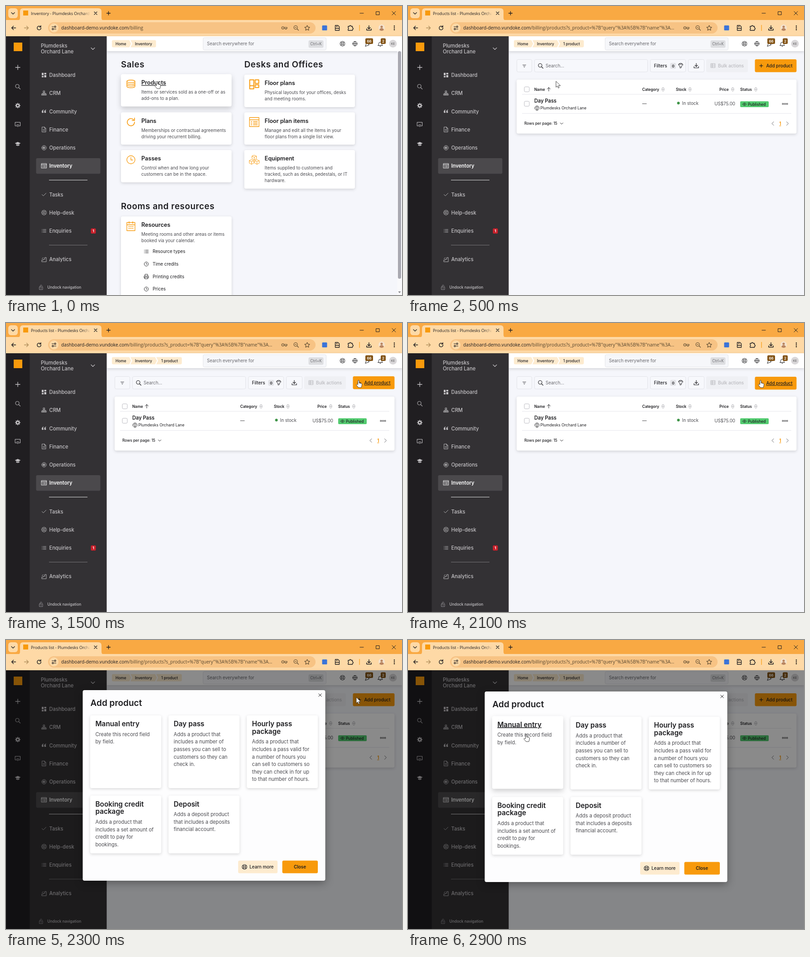
Animation, 875 px wide and 640 px high, one loop 3 s. Source, as an HTML page:

```html
<!DOCTYPE html>
<html lang="en">
<head>
<meta charset="utf-8">
<title>Inventory</title>
<style>
html,body{margin:0;height:100%;overflow:hidden}
svg{display:block;width:100vw;height:100vh;font-family:Inter,sans-serif}
.chrome{font-family:"Open Sans",sans-serif}
.shadow{filter:drop-shadow(0 2px 3px #00000026)}
.lift .shadow{filter:drop-shadow(0 5px 6px #0000002e)}
.float{filter:drop-shadow(0 5px 9px #00000055)}
</style>
</head>
<body>
<svg id="stage" viewBox="0 0 875 640"></svg>
<script>
const ORANGE = '#f89a0c', INK = '#1d1d20', NAV = '#c6c4c7', GREY = '#4b4b50', BAR = '#fed9a6';

// Drawing helpers, each returns SVG markup
const rect = (x, y, w, h, rx, fill, more = '') =>
  `<rect x="${x}" y="${y}" width="${w}" height="${h}" rx="${rx}" fill="${fill}" ${more}/>`;
const text = (x, y, s, size, fill = INK, weight = 400, more = '') =>
  `<text x="${x}" y="${y}" font-size="${size}" fill="${fill}" font-weight="${weight}" ${more}>${s}</text>`;
const lines = (x, y, rows, lh, size, fill, weight) =>
  rows.split('|').map((s, i) => text(x, y + i * lh, s, size, fill, weight)).join('');
const stroke = (x, y, d, color = INK, w = 1, fill = 'none') =>
  `<path transform="translate(${x} ${y})" d="${d}" fill="${fill}" stroke="${color}" stroke-width="${w}" stroke-linejoin="round" stroke-linecap="round"/>`;
const solid = (x, y, d, color) => stroke(x, y, d, 'none', 0, color);
const group = (id, body, more = '') => `<g id="${id}" ${more}>${body}</g>`;
const ring = r => `M${-r} 0a${r} ${r} 0 1 0 ${2 * r} 0a${r} ${r} 0 1 0 ${-2 * r} 0`;
const box = (x, y, w, h = w) => `M${x} ${y}h${w}v${h}h${-w}z`;
const panel = (x, y, w, h) => rect(x, y, w, h, 4, '#fff', 'class="shadow"');

const I = {
  plus: 'M-5 0h10M0-5v10',
  cross: 'M-4-4l8 8M4-4l-8 8',
  down: 'M-3.5-1.5l3.5 3.5 3.5-3.5',
  search: 'M-5-1a4 4 0 1 0 8 0a4 4 0 1 0-8 0M2 2l3.5 3.5',
  blocks: box(-5, -5, 4, 5.5) + box(.5, -5, 4.5, 3.5) + box(-5, 2, 4, 3) + box(.5, 0, 4.5, 5),
  tree: box(-1.5, -5, 3) + box(-5, 2, 2.5) + box(-1.2, 2, 2.5) + box(2.6, 2, 2.5) + 'M0-2v4M-3.8 2v-2h7.6v2',
  quote: 'M-5 1q0-4 4-5v1.3q-1.6 1-1.6 2a2 2 0 1 1-2.4 2zM.5 1q0-4 4-5v1.3q-1.6 1-1.6 2a2 2 0 1 1-2.4 2z',
  doc: 'M-4-5.5h5l3 3v8h-8zM1-5.5v3h3M-2 0h4M-2 2.5h4',
  chip: ring(5) + box(-2, -2, 4) + box(-1, -1, 2),
  table: box(-5.5, -5, 11, 10) + 'M-5.5-2.5h11M-3.5 0h1M-1 0h4.5M-3.5 2.5h1M-1 2.5h4.5',
  check: 'M-4.5 0l3 3 6-6',
  buoy: ring(5.2) + ring(2.3) + 'M-3.6-3.6l2 2M3.6-3.6l-2 2M-3.6 3.6l2-2M3.6 3.6l-2-2',
  list: 'M-4.5-3h.5M-2-3h6.5M-4.5 0h.5M-2 0h6.5M-4.5 3h.5M-2 3h6.5',
  chart: 'M-5 5v-3.5h3.3v-1.5h3.3v-4h3.4v9zM-4.5-1.5l3-2',
  lock: box(-3.5, -1, 7, 6) + 'M-2-1v-2a2 2 0 0 1 4 0M0 1v2',
  clock: ring(4.6) + 'M0-2.6v2.8h2.2',
  bigClock: ring(9) + 'M0-5v5.5h4',
  printer: 'M-3-1v-4h6v4M-3 3h-2v-4h10v4h-2' + box(-3, 1.5, 6, 3.5),
  globe: ring(5) + 'M-5 0h10M0-5q-4.5 5 0 10M0-5q4.5 5 0 10',
  bell: 'M-5 3.5h10q-1.6-1.5-1.6-4a3.4 3.4 0 0 0-6.8 0q0 2.5-1.6 4M-1 5.3h2',
  horn: 'M-5 5l3-8 5 5zM1-3l2-2M3 0h2.5',
  chat: 'M-5.5-5h11v8h-4l-1.5 2-1.5-2h-4zM-2-1h.1M2-1h.1M-2 1h4',
  cap: 'M-6.5-1l6.5-3 6.5 3-6.5 3zM-3.5 1.3v2.4q3.5 2 7 0v-2.4l-3.5 1.7zM-6-.8v4',
  save: 'M0-5v7M-3-.8l3 3 3-3M-5 2v3h10v-3',
  funnel: 'M-4.5-3h9a4.5 3 0 0 1-3 4v3.5l-3 .8v-4.3a4.5 3 0 0 1-3-4M-4-3a4 2.2 0 0 1 8 0',
  sort: 'M-2.5-1.8l2.5-2.6 2.5 2.6M-2.5 1.8l2.5 2.6 2.5-2.6M-3 0h6',
  pin: ring(4.8) + 'M0 3q-2-2.4-2-3.8a2 2 0 0 1 4 0q0 1.4-2 3.8v2',
  eye: 'M-4.3 0q4.3-6 8.6 0q-4.3 6-8.6 0' + ring(1.2),
  coins: 'M-9-5.5a9 3 0 1 0 18 0a9 3 0 1 0-18 0v11a9 3 0 0 0 18 0v-11M-9-1.8a9 3 0 0 0 18 0M-9 1.8a9 3 0 0 0 18 0',
  renew: 'M6-5a8 8 0 1 0 2 5M8-9v5.5h-5.5',
  plan: box(-10, -10, 9, 13) + box(2, -10, 8, 8) + box(-10, 3, 9, 7) + box(2, 1, 8, 6),
  sheet: box(-10.5, -10, 21, 20) + 'M-10.5-5h21M-7-1h2M-2-1h9M-7 2.5h2M-2 2.5h9M-7 6h2M-2 6h9',
  calendar: box(-9, -8, 18, 18) + 'M-9-3h18M-4-10v4M4-10v4M-5 1h2M-1 1h2M3 1h2M-5 5h2M-1 5h2M3 5h2',
  cube: 'M0-5l5 2v5.5l-5 2.5-5-2.5v-5.5zM-5-3l5 2.4 5-2.4M0-.6v5.6',
  arrow: 'M0 0v13l3-2.8 2 4.6 2.2-1-2-4.4h4.2z',
  hand: 'M3.7 9V1.2a1.3 1.3 0 0 1 2.6 0v4.6l4.6 1q1.9.5 1.7 2.2l-.7 4.2-1 2.8h-6l-4.6-5.5q-.7-1.6.8-1.7z'
};

// Browser window
const tab = title => text(55, 19.5, title, 9, INK, 400, 'class="chrome" clip-path="url(#tabClip)"');
const address = path => text(122, 52.3, 'dashboard-demo.vundoke.com' +
  `<tspan fill="#55462f">${path}</tspan>`, 10.2, INK, 400, 'class="chrome"');
const browser = () =>
  rect(0, 0, 875, 67, 0, '#f9a943') + rect(0, 31, 875, 36, 0, BAR) +
  rect(5, 5, 21, 22, 6, BAR) + stroke(15.5, 16, I.down, INK, 1.2) +
  solid(0, 0, 'M25 32q6 0 6-6V12q0-7 7-7h166q7 0 7 7v14q0 6 6 6z', BAR) +
  rect(38, 10, 11, 11, 0, ORANGE) + stroke(198, 16, 'M-3-3l6 6M3-3l-6 6', INK, 1.2) +
  stroke(226.5, 16, 'M-4 0h8M0-4v8', INK, 1.3) +
  stroke(786, 16, 'M-4 0h8') + stroke(821.5, 16, box(-3.5, -3.5, 7)) + stroke(857, 16, I.cross) +
  stroke(17, 48.5, 'M4.5 0h-9M-.5-4l-4 4 4 4', INK, 1.4) +
  stroke(45, 48.5, 'M-4.5 0h9M.5-4l4 4-4 4', '#b08e5c', 1.3) +
  stroke(73, 48.5, 'M3.3-2.6a4.2 4.2 0 1 0 1 2.6M4-5v3h-3', INK, 1.4) +
  rect(93, 36, 591, 25, 12.5, '#f7c384') + `<circle cx="106" cy="48.5" r="10" fill="${BAR}"/>` +
  stroke(106, 48.5, 'M-4.5-2.5h4M1-2.5a1.6 1.6 0 1 0 3.2 0a1.6 1.6 0 1 0-3.2 0M4.5 2.5h-4M-1 2.5a1.6 1.6 0 1 0-3.2 0a1.6 1.6 0 1 0 3.2 0', INK, 1.2) +
  stroke(615, 48.5, 'M-6 0a2.8 2.8 0 1 0 5.6 0a2.8 2.8 0 1 0-5.6 0M0-1.2h6v2.4h-1.5v1.5h-2v-1.5H0M-3.2 0h.2', '#5b4a30', 1.1) +
  stroke(641, 48.5, I.search + 'M-2.5-1h3', '#5b4a30', 1.1) +
  stroke(665.5, 48.5, 'M0-5.5l1.7 3.6 3.9.5-2.9 2.7.8 3.9L0 3.3l-3.5 1.9.8-3.9-2.9-2.7 3.9-.5z', '#5b4a30', 1.1) +
  rect(698.5, 43, 11, 11, 1.5, '#3b74d8') +
  stroke(732, 48.5, 'M-4.5-5.5h6l3 3v8h-9zM-4.5 1h9M-2-3h2', INK, 1.3) +
  stroke(761, 48.5, 'M-5-3.5h3a1.8 1.8 0 0 1 3.6 0h2.9v3.3a1.8 1.8 0 0 1 0 3.6v2.1h-9.5v-3a1.8 1.8 0 0 0 0-3.2z', INK, 1.4) +
  rect(780.5, 42, 1.2, 13, 0, ORANGE) + stroke(802, 48.5, I.save, INK, 1.5) +
  `<circle cx="830" cy="48" r="7" fill="#f4e3cf"/>` +
  solid(830, 48, 'M-2.6-2a2.6 2.6 0 1 1 5.2 0a2.6 2.6 0 1 1-5.2 0M-5 5q1-4 5-4t5 4q-5 4-10 0', '#b98560') +
  [-4, 0, 4].map(d => `<circle cx="858" cy="${48.5 + d}" r="1.2"/>`).join('');

// Left navigation
const navItems = [[153, 'blocks', 'Dashboard'], [193, 'tree', 'CRM'], [233.5, 'quote', 'Community'],
  [273.5, 'doc', 'Finance'], [314, 'chip', 'Operations'], [354, 'table', 'Inventory'],
  [417.5, 'check', 'Tasks'], [457.5, 'buoy', 'Help-desk'], [498, 'list', 'Enquiries'], [561, 'chart', 'Analytics']];
const sidebar = () =>
  rect(0, 67, 53, 573, 0, '#201e21') + rect(52.5, 67, 170, 573, 0, '#333134') +
  rect(17, 81, 19, 19, 0, ORANGE) + stroke(26, 136, I.plus, NAV, 1.3) +
  stroke(26, 178.5, I.search, '#a5a3a6', 1.2) +
  stroke(26, 220.5, ring(3.1), NAV, 2.5) + stroke(26, 220.5, 'M0-5v.1M0 5v.1M-5 0h.1M5 0h.1M-3.5-3.5v.1M3.5-3.5v.1M-3.5 3.5v.1M3.5 3.5v.1', NAV, 2) +
  stroke(26, 262.5, I.chat, NAV) + solid(26, 305, I.cap, NAV) +
  lines(77, 91.5, 'Plumdesks|Orchard Lane', 13.5, 11.2, NAV, 500) + stroke(192, 94.5, 'M-4-2l4 4 4-4', NAV, 1.1) +
  rect(66.5, 337, 142, 34.5, 3, '#4b494c') +
  navItems.map(([y, icon, label]) => {
    const on = label == 'Inventory', color = on ? '#fff' : NAV;
    return (/blocks|quote/.test(icon) ? solid : stroke)(84, y, I[icon], color, .9) +
      text(95.5, y + 4, label, 11.1, color, on ? 600 : 500);
  }).join('') +
  rect(95, 385, 85, 1, 0, '#e0dfe0') + rect(95, 529, 85, 1, 0, '#777578') +
  rect(187.5, 492.5, 11, 11.5, 2, '#c9202b') + text(193, 501.2, '1', 8, '#fff', 700, 'text-anchor="middle"') +
  stroke(77.5, 623, I.lock, '#98969a', .9) + text(91.5, 626, 'Undock navigation', 8.4, NAV, 500);

// Page header
const badge = (x, w, s) => rect(x, 71.5, w, 12.5, 2.5, '#835314') +
  text(x + w / 2, 80.8, s, 8, '#fff', 600, 'text-anchor="middle"');
const header = () =>
  rect(222.5, 67, 653, 573, 0, '#f5f6fb') + rect(222.5, 67, 653, 33, 0, '#fff', 'class="shadow"') +
  rect(435.5, 70, 272, 27.5, 3, '#f6f7fa', 'stroke="#e4e5e9"') +
  text(444, 87.3, 'Search everywhere for', 9.7, '#68686d') +
  rect(668.5, 76, 33, 16.5, 3, '#dddee1') + text(685, 87.3, 'Ctrl+K', 8.4, '#6d6d72', 400, 'text-anchor="middle"') +
  stroke(743.5, 83.5, I.buoy) + stroke(771, 83.5, I.globe, INK, .9) + stroke(799, 84, I.horn) + stroke(827, 84, I.bell) +
  badge(794, 17, '66') + badge(828, 11, '2') +
  `<circle cx="855" cy="83.5" r="8.5" fill="#d9d7d9"/>` + text(855, 86, 'KE', 6.5, '#666', 500, 'text-anchor="middle"');
const crumb = (x, end, label, lx, first, last) =>
  solid(0, 0, `M${x} 75.5H${end}` + (last ? 'q3 0 3 3v10q0 3-3 3' : 'l4 8-4 8') + `H${x}` +
    (first ? 'q-3 0-3-3v-10q0-3 3-3z' : 'l4-8z'), '#fdebcf') + text(lx, 86.8, label, 8.4, INK, 500);

// Overview page
const tile = (x, y, h, icon, title, body, w = 1.3, mark = '') =>
  panel(x, y, 244.5, h) + (icon == 'cubes'
    ? [[0, -5], [-6, 5], [6, 5]].map(([a, b]) => stroke(x + 22 + a, y + 21.5 + b, I.cube, ORANGE, .9)).join('')
    : stroke(x + 22, y + 21.5, I[icon], ORANGE, w)) +
  text(x + 45, y + 23.3, title, 12.6, INK, 600, mark) + lines(x + 45, y + 43.3, body, 14, 9.75, GREY);
const heading = (x, y, s) => text(x, y, s, 18.8, INK, 600, 'letter-spacing=".55"');
const home = () =>
  tab('Inventory - Plumdesks Orchard Lane') + address('/billing') +
  crumb(237, 272.5, 'Home', 242, true) + crumb(275, 328.5, 'Inventory', 285, false, true) +
  heading(254, 136.3, 'Sales') + heading(526.5, 136.3, 'Desks and Offices') + heading(254, 450.3, 'Rooms and resources') +
  group('products', tile(254, 151, 71.5, 'coins', 'Products', 'Items or services sold as a one-off or as|add-ons to a plan.', 1.3, 'text-decoration="underline"'), 'class="lift"') +
  tile(254, 235.5, 71.5, 'renew', 'Plans', 'Memberships or contractual agreements|driving your recurrent billing.', 1.6) +
  tile(254, 319, 71.5, 'bigClock', 'Passes', 'Control when and how long your|customers can be in the space.') +
  tile(526.5, 152, 72, 'plan', 'Floor plans', 'Physical layouts for your offices, desks|and meeting rooms.', 2) +
  tile(526.5, 235.5, 71.5, 'sheet', 'Floor plan items', 'Manage and edit all the items in your|floor plans from a single list view.') +
  tile(526.5, 319, 85.5, 'cubes', 'Equipment', 'Items supplied to customers and|tracked, such as desks, pedestals, or IT|hardware.') +
  tile(254, 466, 190, 'calendar', 'Resources', 'Meeting rooms and other areas or items|booked via your calendar.') +
  ['list|Resource types', 'clock|Time credits', 'printer|Printing credits', 'clock|Prices'].map((row, i) => {
    const [icon, label] = row.split('|'), y = 543.7 + i * 27.7;
    return stroke(310, y, I[icon], INK, .9) + text(324, y + 3.5, label, 9.8);
  }).join('') +
  rect(864.5, 100, 11, 540, 0, '#f9f9fb') + rect(866, 100, 7, 504, 3.5, '#a9a9b1') +
  solid(869.5, 634, 'M-3-2h6l-3 4z', '#8b8b90');

// Product list page
const field = (x, w) => rect(x + .5, 118.5, w - 1, 27.5, 3, '#f7f8fc', 'stroke="#e2e3e8"');
const list = () =>
  tab('Products list - Plumdesks Orchard Lane') +
  address('/billing/products?s_product=%7B"query"%3A%5B%7B"name"%3A...') +
  crumb(237, 272.5, 'Home', 242, true) + crumb(275, 329.5, 'Inventory', 285) + crumb(332, 385.5, '1 product', 343, false, true) +
  field(240, 34) + stroke(257, 132.5, 'M-3.5-2h7M-2 .5h4M-.7 3h1.4', '#55555a') +
  field(279, 251) + stroke(293, 132.5, I.search, INK, 1.1) + text(304, 136, 'Search...', 9.8, '#68686d') +
  field(535, 79) + text(543.5, 136, 'Filters', 9.8, INK, 500) + rect(579.5, 126, 12.5, 13, 2.5, '#e3e4e8') +
  text(586, 135.6, '0', 8.2, INK, 600, 'text-anchor="middle"') + stroke(602.5, 132, I.funnel) +
  field(619, 36) + stroke(637, 132, I.save, INK, 1.2) +
  rect(659, 118, 92, 28.5, 3, '#eff0f4') + stroke(674, 132, box(-4.5, -4.5, 9) + 'M-4.5-1.5h9M-4.5 1.5h9M-1.5-4.5v9', '#b9b9be', 1) +
  text(685, 136, 'Bulk actions', 9.8, '#b9b9be', 500) +
  group('add', rect(766.5, 118, 92, 28.5, 3, ORANGE) + stroke(780.5, 132.3, 'M-3.5 0h7M0-3.5v7', INK, 1.2) +
    text(791.5, 135.9, 'Add product', 9.8, INK, 500)) +
  panel(240, 163, 618.5, 119.5) +
  [179, 211].map(y => rect(257, y, 11, 11, 2.5, '#fff', 'stroke="#b9b9c0"')).join('') +
  [[279, 'Name'], [517.5, 'Category', 563.5], [592, 'Stock', 623], [688, 'Price', 717.5], [734, 'Status', 768.5]]
    .map(([x, s, at]) => text(x, 187.6, s, 8.4, INK, 600) + (at ? stroke(at, 184.5, I.sort, '#8d8d93', .9) : '')).join('') +
  stroke(311, 184.5, 'M0 4v-8M-3.5-.5l3.5-3.5 3.5 3.5') +
  rect(252, 195, 595, 1, 0, '#e6e6eb') + rect(252, 237.5, 595, 1, 0, '#e6e6eb') +
  text(279, 214, 'Day Pass', 11.1, INK, 600) + stroke(285, 226, I.pin, INK, .9) +
  text(292.5, 228.8, 'Plumdesks Orchard Lane', 8.6) + text(517.5, 220, '—', 9.8) +
  `<circle cx="597.5" cy="215" r="3" fill="#3f9448"/>` + text(605.5, 218.6, 'In stock', 9.8, GREY) +
  text(723, 219.8, 'US$75.00', 9.8, GREY, 400, 'text-anchor="end"') +
  rect(734, 211, 63, 13, 2, '#53cb70') + stroke(743.5, 217.5, I.eye, INK, .9) + text(751, 220.5, 'Published', 8.4, INK, 500) +
  [828.5, 833, 837.5].map(x => rect(x - 1.4, 215.4, 2.8, 2.8, .8, 'none', `stroke="${INK}" stroke-width=".9"`)).join('') +
  text(257, 263.2, 'Rows per page: 15', 8.4, INK, 500) + stroke(339.5, 260.3, 'M-3-1.5l3 3 3-3') +
  stroke(806, 260.3, 'M2-4l-4 4 4 4', '#66666b') + stroke(838.5, 260.3, 'M-2-4l4 4-4 4', '#66666b') +
  text(822.3, 264, '1', 9.8, ORANGE, 700, 'text-anchor="middle" text-decoration="underline"');

// Dialog
const option = (id, x, y, h, title, body) => {
  const rows = title.split('|').length;
  return group(id, panel(x, y, 157, h) + lines(x + 11.5, y + 24, title, 16.8, 15.3, INK, 600) +
    lines(x + 11.5, y + 29 + rows * 16.7, body, 16.6, 11.1, GREY));
};
const dialog = () =>
  rect(169.5, 114, 536, 422, 4, '#fdfdfe', 'class="float"') + text(186.5, 148.7, 'Add product', 19, INK, 600) +
  stroke(694, 125, 'M-3.2-3.2l6.4 6.4M3.2-3.2l-6.4 6.4') +
  option('opt0', 186, 170, 161, 'Manual entry', 'Create this record field|by field.') +
  option('opt1', 359, 170, 161, 'Day pass', 'Adds a product that|includes a number of|passes you can sell to|customers so they can|check in.') +
  option('opt2', 532, 170, 161, 'Hourly pass|package', 'Adds a product that|includes a pass valid for|a number of hours you|can sell to customers so|they can check in for up|to that number of hours.') +
  option('opt3', 186, 347.5, 128, 'Booking credit|package', 'Adds a product that|includes a set amount of|credit to pay for|bookings.') +
  option('opt4', 359, 347.5, 128, 'Deposit', 'Adds a deposit product|that includes a deposits|financial account.') +
  rect(513, 491.5, 87, 28, 3, '#fdebcf') + stroke(527, 505.5, I.buoy, INK, 1.1) + text(538, 509.2, 'Learn more', 9.8, INK, 500) +
  rect(610.5, 491.5, 78.5, 28, 3, ORANGE) + text(649.5, 509.2, 'Close', 9.8, INK, 600, 'text-anchor="middle"');

const $ = id => document.getElementById(id);
$('stage').innerHTML =
  `<defs><linearGradient id="fade"><stop offset=".88" stop-color="${BAR}" stop-opacity="0"/><stop offset="1" stop-color="${BAR}"/></linearGradient>
  <clipPath id="tabClip"><rect x="50" y="5" width="136" height="26"/></clipPath></defs>` +
  browser() + header() + sidebar() + group('home', home()) + group('list', list()) +
  rect(55, 8, 131, 18, 0, 'url(#fade)') +
  rect(0, 67, 875, 573, 0, '#000', 'id="dim"') + group('dialog', dialog()) +
  group('pointer', stroke(0, 0, I.arrow, '#333', .9, '#fff') + stroke(0, 0, I.hand, '#333', .9, '#fff'));

const show = (el, on) => el.style.display = on ? '' : 'none';
const shift = (el, x, y) => el.setAttribute('transform', `translate(${x} ${y})`);
const underline = (el, on) => el.setAttribute('text-decoration', on ? 'underline' : 'none');
const ease = (t, from, to) => {
  const k = Math.min(1, Math.max(0, (t - from) / (to - from)));
  return k * k * (3 - 2 * k);
};

function render(t) {
  const onHome = t < 300, toAdd = ease(t, 800, 1400), toCard = ease(t, 2300, 2900);
  const x = (onHome ? 329 : 327) + 447 * toAdd - 518 * toCard;
  const y = 167 - 40 * toAdd + 82 * toCard;
  const open = t >= 2200;

  show($('home'), onHome);
  show($('list'), !onHome);
  const onAdd = !open && x > 766;
  shift($('add'), 0, t >= 2100 && t < 2300 ? 1 : 0);
  underline($('add').querySelector('text'), onAdd);

  $('dim').setAttribute('opacity', !open ? 0 : t < 2300 ? .15 : .46);
  show($('dialog'), open);
  $('dialog').setAttribute('opacity', t < 2300 ? .2 : 1);
  shift($('dialog'), 0, t < 2300 ? 9 : t < 2400 ? -3 : t < 2500 ? -1 : 0);

  let onCard = false;
  [186, 359, 532].forEach((left, i) => {
    const hit = open && x > left && x < left + 157 && y > 170 && y < 331;
    const card = $('opt' + i);
    shift(card, 0, hit ? -1.5 : 0);
    card.classList.toggle('lift', hit);
    card.querySelectorAll('text').forEach(el => underline(el, hit && el.getAttribute('font-weight') == 600));
    onCard ||= hit;
  });

  const hand = onHome || onAdd || onCard;
  const [arrow, finger] = $('pointer').children;
  show(arrow, !hand);
  show(finger, hand);
  shift($('pointer'), x, y);
}

// Time advances in tenths of a second
function loop(now) {
  render(Math.floor(now % 3000 / 100) * 100);
  requestAnimationFrame(loop);
}
render(0);
requestAnimationFrame(loop);
</script>
</body>
</html>
```
